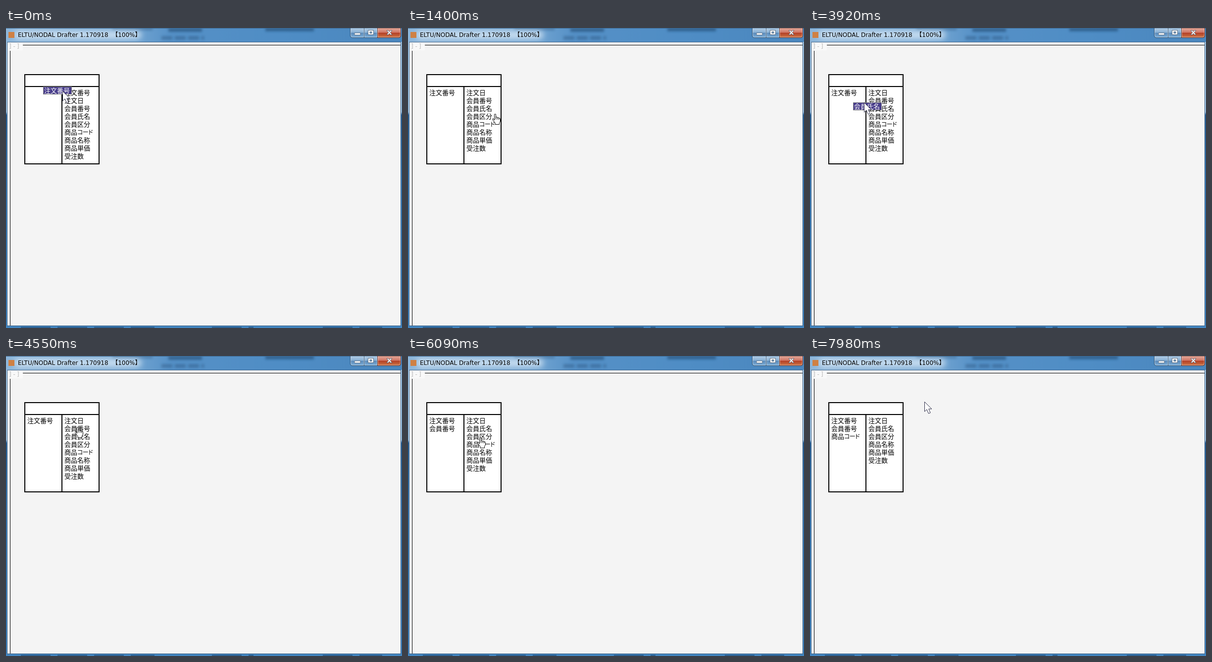
Recreate the animation shown at these times as an HTML page. Size 800 px wide and 605 px high, loop 8 s.

```html
<!DOCTYPE html>
<html lang="ja">
<head>
<meta charset="utf-8">
<title>Table editor</title>
<style>
  html, body { margin: 0; width: 100%; height: 100%; overflow: hidden; background: #f4f4f4; }
  svg { display: block; width: 800px; height: 605px; }
  text { white-space: pre; }
  .item { font: 13px "Noto Sans CJK JP", "Noto Sans CJK", sans-serif; font-feature-settings: "palt"; }
  .kana { font-size: 12px; letter-spacing: -.6px; }
  .title { font: 12px "DejaVu Sans", "Noto Sans CJK JP", sans-serif; }
  .tag { font: 13px "DejaVu Sans Mono", monospace; }
</style>
</head>
<body>
<svg viewBox="0 0 800 605">
  <defs>
    <linearGradient id="glass">
      <stop offset="0" stop-color="#8db6da"/>
      <stop offset=".3" stop-color="#78a9d4"/>
      <stop offset=".42" stop-color="#5590c6"/>
      <stop offset=".7" stop-color="#4f8dc5"/>
      <stop offset="1" stop-color="#4a86bd"/>
    </linearGradient>
    <linearGradient id="side" x2="0" y2="1">
      <stop offset="0" stop-color="#a3c6e4"/>
      <stop offset=".28" stop-color="#a3c6e4"/>
      <stop offset=".29" stop-color="#2c6296"/>
      <stop offset=".5" stop-color="#3b7ab4"/>
      <stop offset="1" stop-color="#4285c0"/>
    </linearGradient>
    <linearGradient id="button" x2="0" y2="1">
      <stop offset="0" stop-color="#b5d0e8"/>
      <stop offset=".48" stop-color="#86aed3"/>
      <stop offset=".5" stop-color="#5888b8"/>
      <stop offset="1" stop-color="#7fb0d9"/>
    </linearGradient>
    <linearGradient id="close" x2="0" y2="1">
      <stop offset="0" stop-color="#e5ad9f"/>
      <stop offset=".48" stop-color="#cf7261"/>
      <stop offset=".5" stop-color="#b23c22"/>
      <stop offset="1" stop-color="#cf7a4c"/>
    </linearGradient>
    <filter id="blur" x="-20%" y="-200%" width="140%" height="500%"><feGaussianBlur stdDeviation="2.5"/></filter>
    <filter id="glow" x="-20%" y="-80%" width="140%" height="260%"><feGaussianBlur stdDeviation="6"/></filter>
    <clipPath id="bar"><rect width="800" height="28"/></clipPath>
  </defs>

  <!-- window frame -->
  <rect width="800" height="605" fill="url(#side)"/>
  <path d="M30 604H300M416 604H500M640 604H760" stroke="#1d456e" stroke-width="3" stroke-dasharray="60 14" opacity=".6"/>
  <g clip-path="url(#bar)">
    <rect width="800" height="28" fill="url(#glass)"/>
    <g filter="url(#blur)" stroke="#173d63" fill="none" opacity=".55">
      <path d="M328 4H396M524 3H622" stroke-width="7"/>
      <path d="M314 20H400" stroke-width="7" stroke-dasharray="22 5" opacity=".6"/>
      <path d="M215 2H296" stroke-width="5" opacity=".6"/>
    </g>
    <rect x="16" y="5" width="258" height="18" rx="9" fill="#e3eff9" opacity=".7" filter="url(#glow)"/>
    <path d="M0 .5H800" stroke="#3b668f"/>
  </g>
  <rect x="5" y="8" width="12" height="12" fill="#cf8144"/>
  <text class="title" x="24" y="18">ELTU/NODAL Drafter 1.170918  【100%】</text>

  <g stroke="#2f5172">
    <path d="M695.5 0V15Q695.5 19.5 700 19.5H723.5V0Z" fill="url(#button)"/>
    <path d="M723.5 0H750.5V19.5H723.5Z" fill="url(#button)"/>
    <path d="M750.5 0H797.5V15Q797.5 19.5 793 19.5H750.5Z" fill="url(#close)" stroke="#5a2a22"/>
  </g>
  <path d="M696.5 1V15Q697 18.5 700 18.5H722.5V1M724.5 1V18.5H749.5V1M751.5 1V18.5H793Q796.5 18 796.5 15V1"
        fill="none" stroke="#fff" opacity=".45"/>
  <g fill="#fff" stroke="#45566a" stroke-width=".8">
    <rect x="704" y="10" width="12" height="4" rx="1"/>
    <path d="M731.5 4.5H742.5V13.5H731.5ZM735 7.5V10.5H739V7.5Z" fill-rule="evenodd"/>
    <path d="M769 5H772.5L774.5 7.4 776.5 5H780L776.3 9.2 780 13.5H776.5L774.5 11 772.5 13.5H769L772.7 9.2Z"/>
  </g>

  <!-- client area -->
  <rect x="2.5" y="28.5" width="795" height="572" fill="#f4f4f4" stroke="#3f6286"/>
  <path d="M3 29.5H797" stroke="#fff"/>
  <path d="M34 34.5H797M8.5 46V600" stroke="#000" fill="none"/>
  <rect x="8" y="29" width="26" height="16" fill="#fafafa" opacity=".8"/>
  <text class="tag" x="5" y="41" fill="#bcbcbc">]-]</text>

  <!-- entity -->
  <path d="M38 94H188V274H38Z" fill="#fff" stroke="#000" stroke-width="2"/>
  <path d="M38 118H188M113 118V274" stroke="#000" stroke-width="2"/>
  <g id="rows" class="item"></g>

  <g id="plate" class="item">
    <rect height="16" fill="#483d8b"/>
    <rect x=".5" y=".5" height="15" fill="none" stroke="#b7c274" stroke-dasharray="1 1"/>
    <text x="2" y="13" fill="#fff"></text>
  </g>

  <g id="cursor" fill="#fff" stroke-linejoin="round">
    <path id="arrow" d="M.5 .5V20L5 15.8 8.5 24 12.2 22.5 8.8 14.8H15Z" stroke="#30304a"/>
    <g id="hand" transform="translate(-5 0)" stroke="#000" fill="none">
      <path fill="#fff" d="M4.5 13V2.2Q4.5 .5 6 .5T7.5 2.2V7Q10.5 5.6 10.7 7.8 13.5 6.6 13.7 9 16.5 8.4 16.5 10.5V15L14.5 18.5V21.5H6V18.5L1.2 12.5Q0 10 1.5 9.6 2.8 9.4 4.5 13Z"/>
      <path d="M7.5 7V11.5M10.7 8V11.5M13.7 9V12"/>
    </g>
  </g>
</svg>

<script>
const LOOP = 8000, STEP = 70;
const LEFT = 38, MIDDLE = 113, RIGHT = 188, TOP = 118, ROW = 16;
const $ = id => document.getElementById(id);

const FIELDS = ['注文番号', '注文日', '会員番号', '会員氏名', '会員区分',
                '商品コード', '商品名称', '商品単価', '受注数'];

// pointer moves: first step, last step, where it ends
const MOVES = [
  [-420, 0, 114, 127], [70, 420, 89, 131],
  [980, 1120, 134, 138], [1260, 1400, 175, 173], [1610, 2170, 156, 180],
  [2380, 2730, 150, 200], [2940, 3570, 135, 150],
  [3850, 3920, 109, 150], [4130, 4550, 144, 143], [4970, 5390, 75, 149],
  [5950, 6090, 145, 164], [6160, 6230, 159, 186], [6440, 6580, 155, 181],
  [6860, 7280, 77, 172], [7630, 7980, 231, 92]
];
// times of pressing and releasing the button
const PRESSES = [[-490, 560], [3710, 4410], [4690, 5530], [6790, 7560]];

const smooth = p => p * p * (3 - 2 * p);
const place = (el, x, y) => el.setAttribute('transform', `translate(${x} ${y})`);
const show = (el, on) => el.setAttribute('visibility', on ? 'visible' : 'hidden');
const markup = name => name.replace(/[ァ-ー]+/, '<tspan class="kana">$&</tspan>');

function pointerAt(t) {
  let x = 152, y = 127;
  for (const [from, to, endX, endY] of MOVES) {
    if (t < from) break;
    const p = smooth(Math.min(1, (t - from + STEP) / (to - from + STEP)));
    x += (endX - x) * p;
    y += (endY - y) * p;
  }
  return [Math.round(x), Math.round(y)];
}

// a field dropped in the left column becomes a key
function columnsAt(t) {
  const keys = drags.filter(d => d.isKey && t >= d.end).map(d => d.name);
  return [keys, FIELDS.filter(f => !keys.includes(f))];
}

function fieldAt([x, y], [keys, rest]) {
  if (x < LEFT || x > RIGHT) return;
  return (x < MIDDLE ? keys : rest)[Math.floor((y - TOP) / ROW)];
}

const drags = [];
for (const [begin, end] of PRESSES) {
  const grab = pointerAt(begin), columns = columnsAt(begin);
  const name = fieldAt(grab, columns);
  const top = TOP + ROW * columns[1].indexOf(name);
  drags.push({ begin, end, name, grab, top, isKey: pointerAt(end)[0] < MIDDLE });
}

const column = (names, x) => names.map((name, i) =>
  `<text x="${x}" y="${TOP + 17 + ROW * i}">${markup(name)}</text>`).join('');

function drawPlate(drag, x, y) {
  show($('plate'), drag);
  if (!drag) return;
  const [fill, edge, label] = $('plate').children;
  label.innerHTML = markup(drag.name);
  const width = Math.round(label.getComputedTextLength()) + 6;
  fill.setAttribute('width', width);
  edge.setAttribute('width', width - 1);
  place($('plate'), MIDDLE + x - drag.grab[0], drag.top + y - drag.grab[1]);
}

function draw(now) {
  const t = Math.floor(now % LOOP / STEP) * STEP;
  const [x, y] = pointerAt(t), columns = columnsAt(t);
  $('rows').innerHTML = column(columns[0], LEFT + 5) + column(columns[1], MIDDLE + 5);

  const drag = drags.find(d => t >= d.begin && t < d.end);
  drawPlate(drag, x, y);

  const moved = drag && (x !== drag.grab[0] || y !== drag.grab[1]);
  const hand = !moved && fieldAt([x, y], columns);
  show($('hand'), hand);
  show($('arrow'), !hand);
  place($('cursor'), x, y);
}

const start = performance.now();
function tick() {
  draw(performance.now() - start);
  requestAnimationFrame(tick);
}
tick();
</script>
</body>
</html>
```
